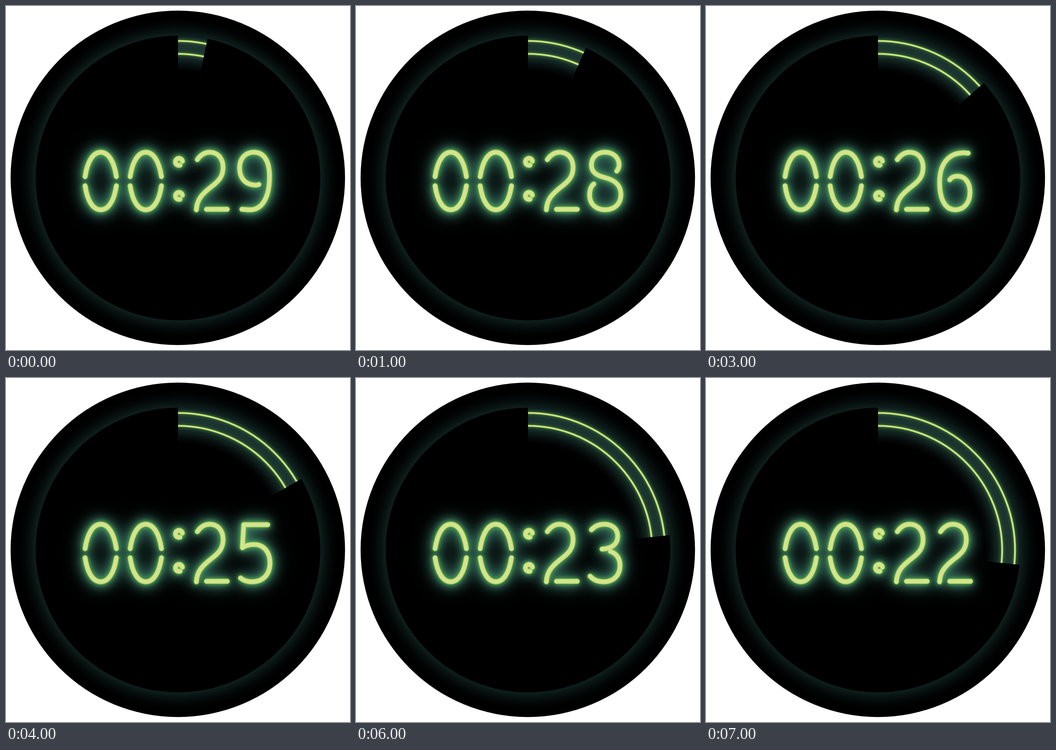
An HTML page with a canvas for the animation above (8 s loop, 748 px wide and 748 px high).

```html
<!DOCTYPE html>
<html lang="en">
<head>
<meta charset="utf-8">
<title>Neon countdown</title>
<style>
  html, body { margin: 0; width: 100%; height: 100%; overflow: hidden; background: #fff; }
  canvas { display: block; }
</style>
</head>
<body>
<canvas id="stage" width="748" height="748"></canvas>
<script>
const ctx = document.getElementById('stage').getContext('2d');
const CENTER = 374, TAU = Math.PI * 2;
const START = 29, STEPS = 8, STEP_ANGLE = TAU / 30;

// Tube paths, each relative to the centre of its digit cell.
const GLYPHS = {
  0: 'M-34 371C-29 337 -16 318 0 318S29 337 34 371M-34 391C-29 425 -16 443 0 443S29 425 34 391',
  2: 'M-31 334C-24 324 -15 318 -4 318C14 318 25 332 25 351C25 370 16 380 2 391C-20 408 -32 420 -33 443M-11 442H34',
  3: 'M-29 330C-22 322 -12 318 -1 318C17 318 28 329 28 344C28 362 14 371 -6 372M12 377C26 382 33 393 33 408C33 429 19 443 -2 443C-14 443 -25 439 -32 431',
  4: 'M18 384V319H14L-40 405H36M18 427V443',
  5: 'M28 319H-24L-27 369C-20 364 -11 362 -2 362C20 362 33 379 33 402C33 427 18 443 -6 443C-16 443 -25 440 -31 435',
  6: 'M29 320C-8 315 -33 338 -33 383C-33 422 -20 443 1 443C20 443 33 428 33 405C33 384 22 370 6 370C-2 370 -8 373 -11 378',
  7: 'M-33 319H40M29 341L-9 443',
  8: 'M26 359C38 345 28 318 0 318C-18 318 -29 330 -29 346C-29 362 -17 369 0 373C23 379 35 390 35 410C35 430 21 443 1 443C-19 443 -33 431 -33 411C-33 401 -30 392 -24 387',
  9: 'M9 388C4 390 1 390 -3 389C-22 387 -33 373 -33 352C-33 331 -20 318 -2 318C20 318 32 337 32 371C32 416 16 443 -10 443C-17 443 -23 442 -28 442',
  ':': 'M7.5 337.5A7.5 7.5 0 1 0 2.5 346M7.5 411.5A7.5 7.5 0 1 0 2.5 420'
};
const CELLS = [206, 304, 376, 447, 541];

function displayPath(text) {
  const path = new Path2D();
  [...text].forEach((char, i) =>
    path.addPath(new Path2D(GLYPHS[char]), new DOMMatrix([1, 0, 0, 1, CELLS[i], 0])));
  return path;
}

function disc(center, radius, fill) {
  ctx.fillStyle = fill;
  ctx.beginPath();
  ctx.arc(center, center, radius, 0, TAU);
  ctx.fill();
}

function stroke(path, width, color, glow = 'transparent', blur = 0) {
  ctx.lineWidth = width;
  ctx.strokeStyle = color;
  ctx.shadowColor = glow;
  ctx.shadowBlur = blur;
  ctx.stroke(path);
  ctx.shadowColor = 'transparent';
}

function ringGlow() {
  const glow = ctx.createRadialGradient(CENTER, CENTER, 0, CENTER, CENTER, 363);
  const stops = [[232, '#000'], [245, '#060d0c'], [257, '#10211e'], [268, '#1a322d'],
    [284, '#1c342f'], [299, '#19302b'], [310, '#0e1f1d'], [320, '#081311'],
    [332, '#030707'], [346, '#000']];
  stops.forEach(([radius, color]) => glow.addColorStop(radius / 363, color));
  return glow;
}

function draw(step) {
  ctx.clearRect(0, 0, 748, 748);
  disc(373.6, 363.6, '#000');
  disc(CENTER, 350, ringGlow());

  for (const radius of [270, 298]) {
    const ring = new Path2D();
    ring.arc(CENTER, CENTER, radius, 0, TAU);
    stroke(ring, 4.6, '#76b148', '#4a8a45', 7);
    stroke(ring, 3.1, '#d3e383');
  }

  // The black sector hides the time that has not yet run.
  const top = -TAU / 4;
  ctx.fillStyle = '#000';
  ctx.beginPath();
  ctx.moveTo(CENTER, CENTER);
  ctx.arc(CENTER, CENTER, 309.5, top + (step + 1) * STEP_ANGLE, top + TAU);
  ctx.fill();

  const digits = displayPath('00:' + (START - step));
  ctx.lineCap = ctx.lineJoin = 'round';
  stroke(digits, 11, '#79bf4b', '#50a08c', 44);
  stroke(digits, 11, '#79bf4b', '#50a08c', 30);
  stroke(digits, 11, '#79bf4b', '#4b9c74', 18);
  stroke(digits, 11.5, '#83c74f', '#5cb04c', 8);
  stroke(digits, 9, '#d5e38c');
}

let shown = -1;
function tick() {
  const step = Math.floor(performance.now() / 1000) % STEPS;
  if (step !== shown) draw(shown = step);
  requestAnimationFrame(tick);
}
tick();
</script>
</body>
</html>
```
